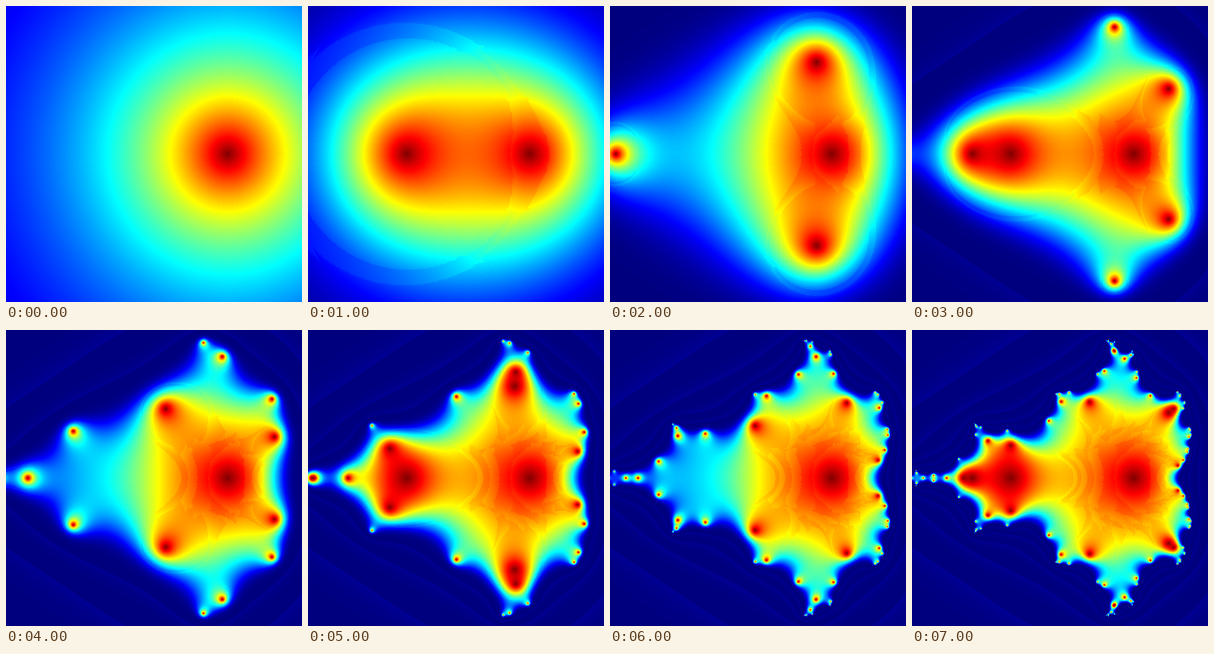
Recreate the animation shown at these times as an HTML page with a canvas. Size 400 by 400 pixels, loop 8 s.

```html
<!DOCTYPE html>
<html lang="en">
<head>
<meta charset="utf-8">
<title>Iterates of z² + c</title>
<style>
  html, body { margin: 0; height: 100%; overflow: hidden; }
  canvas { display: block; width: 100vw; height: 100vh; }
</style>
</head>
<body>
<canvas width="400" height="400"></canvas>
<script>
const SIZE = 400, STEPS = 8, STEP_MS = 1000;
const FUZZ = 3 * (0.05 * 255) ** 2; // squared colour distance that counts as unchanged
const ctx = document.querySelector('canvas').getContext('2d');

const stops = [
  [0, 0, 127], [0, 0, 255], [0, 127, 255], [0, 255, 255], [127, 255, 127],
  [255, 255, 0], [255, 127, 0], [255, 0, 0], [127, 0, 0]
];
const palette = Array.from({ length: 256 }, (_, i) => {
  const t = i / 255 * (stops.length - 1);
  const k = Math.min(Math.floor(t), stops.length - 2);
  return stops[k].map((v, ch) => Math.round(v + (stops[k + 1][ch] - v) * (t - k)));
});

const count = SIZE * SIZE;
const re = new Float64Array(count), im = new Float64Array(count);
const coord = (pixel, start) => start + 2.4 * pixel / (SIZE - 1);

// Advance z = z² + c everywhere; pixels whose colour barely changes keep the old one.
function nextImage(previous) {
  const image = ctx.createImageData(SIZE, SIZE), data = image.data;
  if (previous) data.set(previous.data);
  for (let i = 0; i < count; i++) {
    const x = re[i], y = im[i];
    re[i] = x * x - y * y + coord(i % SIZE, -1.8);
    im[i] = 2 * x * y + coord(Math.floor(i / SIZE), -1.2);
    const [r, g, b] = palette[Math.round(255 * Math.exp(-Math.hypot(re[i], im[i])))];
    const p = 4 * i;
    const change = (r - data[p]) ** 2 + (g - data[p + 1]) ** 2 + (b - data[p + 2]) ** 2;
    if (previous && change <= FUZZ) continue;
    data[p] = r;
    data[p + 1] = g;
    data[p + 2] = b;
    data[p + 3] = 255;
  }
  return image;
}

const images = [];
for (let n = 0; n < STEPS; n++) images.push(nextImage(images[n - 1]));

function draw() {
  ctx.putImageData(images[Math.floor(performance.now() / STEP_MS) % STEPS], 0, 0);
  requestAnimationFrame(draw);
}
draw();
</script>
</body>
</html>
```
